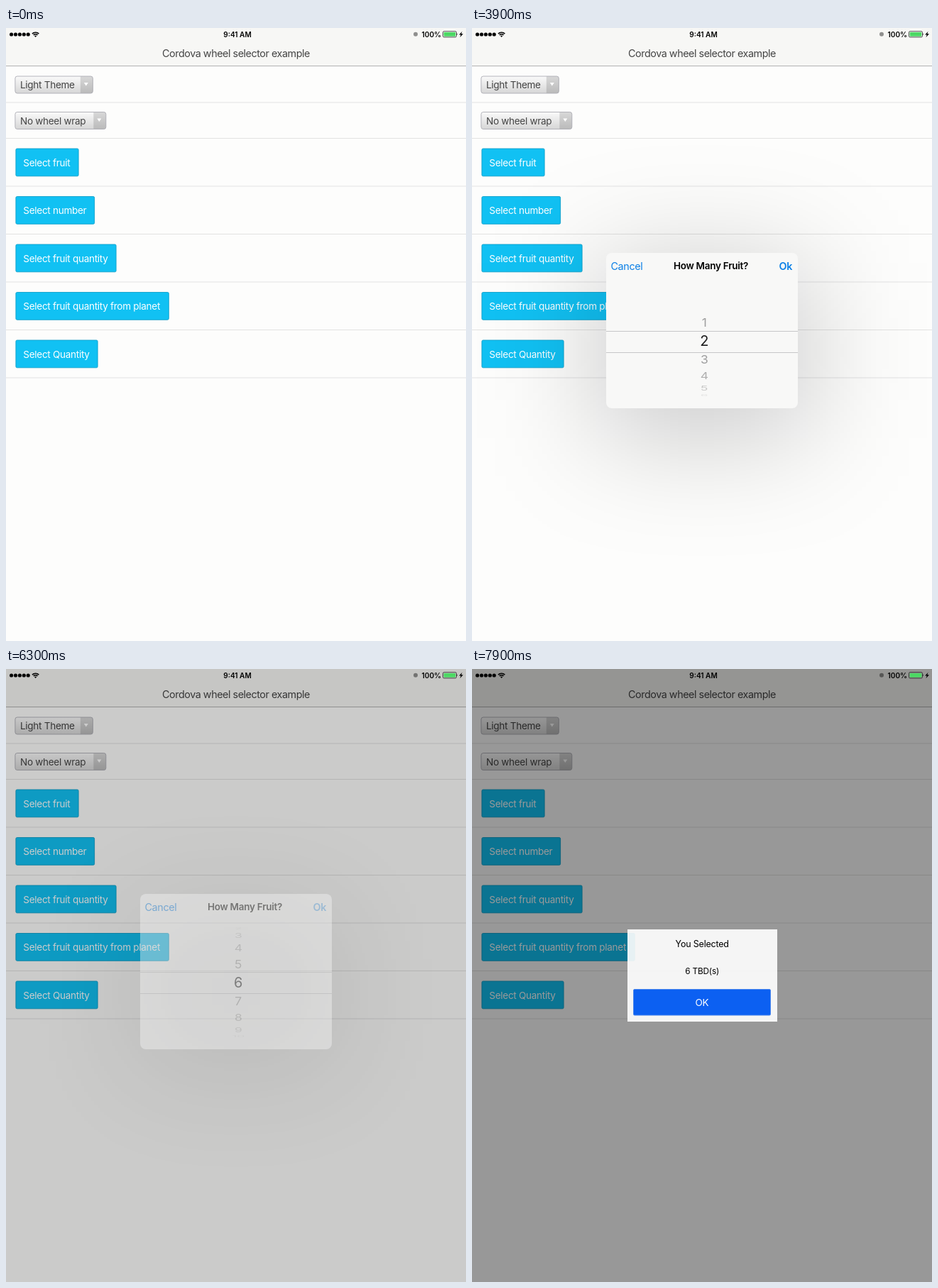
These frames come from a looping animation (648x864 px, 8000 ms). An HTML page:

```html
<!DOCTYPE html>
<html lang="en">
<head>
<meta charset="utf-8">
<title>Wheel selector</title>
<style>
  html, body { margin: 0; width: 100%; height: 100%; overflow: hidden; background: #fdfdfc; }
  body { position: relative; }
  svg, div { position: absolute; display: block; }
  svg { left: 0; top: 0; }
  text { font: 13.5px Inter, Roboto, sans-serif; letter-spacing: -.27px; fill: #444; }
  .mid { text-anchor: middle; }
  .title { font-size: 14.34px; letter-spacing: -.45px; }
  .status { font-size: 10.1px; font-weight: 600; letter-spacing: 0; fill: #000; }
  .button rect { fill: #11c1f3; stroke: #0a9dc7; stroke-width: .84; }
  .button text { fill: #fff; }

  .backdrop, .alert, .press, .popup, .shadow, .ok {
    animation: 8s step-end infinite;
  }
  .backdrop {
    left: 0; top: 0; width: 648px; height: 864px;
    background: rgba(0, 0, 0, .4);
    animation-name: dim;
  }
  .alert {
    left: 219px; top: 367px; width: 211px; height: 130px;
    background: rgba(255, 255, 255, .9);
    animation-name: alert;
  }
  .alert text { fill: #000; }
  .alert .head { font-size: 12.5px; letter-spacing: -.2px; }
  .alert .body { font-size: 11.8px; letter-spacing: -.18px; }
  .alert .label { fill: #fff; }
  .press { animation-name: press; }
  .shadow {
    left: 174px; top: 331px; width: 300px; height: 247px;
    background: rgba(0, 0, 8, .2);
    filter: blur(80px);
    animation-name: popup;
  }
  .popup {
    left: 189px; top: 317px; width: 270px; height: 219px;
    border-radius: 8px; background: #f8f8f7;
    animation-name: popup;
  }
  .popup .head { font-weight: 600; fill: #000; }
  .popup .action { font-size: 14.34px; letter-spacing: -.35px; fill: #0a7fe6; }
  .popup .ok { font-weight: 600; animation-name: tap; }
  #wheel text { letter-spacing: 0; }

  @keyframes popup {
    0% { opacity: 0; }
    28.75% { opacity: .15; }
    30% { opacity: .4; }
    31.25% { opacity: .7; }
    32.5% { opacity: .9; }
    33.75% { opacity: 1; }
    77.5% { opacity: .8; }
    78.75% { opacity: .4; }
    80% { opacity: .07; }
    81.25%, 100% { opacity: 0; }
  }
  @keyframes tap {
    0% { opacity: 1; }
    77.5% { opacity: .65; }
    80%, 100% { opacity: 1; }
  }
  @keyframes dim {
    0% { opacity: 0; }
    78.75% { opacity: .5; }
    80%, 100% { opacity: 1; }
  }
  @keyframes alert {
    0% { opacity: 0; transform: scale(1.2); }
    80% { opacity: .07; transform: scale(1.195); }
    81.25% { opacity: .65; transform: scale(1.07); }
    82.5%, 100% { opacity: 1; transform: none; }
  }
  @keyframes press {
    0% { fill: #387ef5; }
    97.5%, 100% { fill: #0c60f2; }
  }
</style>
</head>
<body>

<svg width="648" height="864" viewBox="0 0 648 864">
  <defs>
    <linearGradient id="face" x2="0" y2="1">
      <stop stop-color="#fafafa"/><stop offset="1" stop-color="#d6d6d6"/>
    </linearGradient>
    <linearGradient id="knob" x2="0" y2="1">
      <stop stop-color="#d8d8d8"/><stop offset="1" stop-color="#bababa"/>
    </linearGradient>
  </defs>
  <rect width="648" height="864" fill="#fdfdfc"/>
  <rect width="648" height="53" fill="#f7f7f5"/>
  <path d="M0 53.5H648" stroke="#b2b2b2"/>
  <text class="title mid" x="324" y="40.6">Cordova wheel selector example</text>
  <path d="M0 105H648M0 155.5H648M0 223H648M0 290.5H648M0 358H648M0 425.5H648M0 493H648" stroke="#ddd" stroke-width=".84"/>
  <g id="page"></g>
</svg>

<div class="backdrop"></div>

<svg width="648" height="20" viewBox="0 0 648 20">
  <path d="M7.6 9H31.5" stroke="#000" stroke-width="5.2" stroke-linecap="round" stroke-dasharray="0 5.9"/>
  <g fill="none" stroke="#000" stroke-width="1.5">
    <path d="M36.9 8.1a6.6 6.6 0 0 1 9.4 0M38.7 10a4 4 0 0 1 5.8 0"/>
  </g>
  <path d="M41.6 13l-1.6-1.7a2.3 2.3 0 0 1 3.2 0z"/>
  <text class="status mid" x="326" y="12.7">9:41 AM</text>
  <circle cx="577" cy="8.8" r="3" fill="#000" opacity=".42"/>
  <text class="status" x="585.5" y="12.7">100%</text>
  <rect x="615.5" y="4.7" width="19" height="8.2" rx="1.6" fill="none" stroke="#222" stroke-width=".8"/>
  <rect x="616.7" y="5.9" width="16.6" height="5.8" rx=".7" fill="#4cd964"/>
  <path d="M635.4 7.2q1.4 1.5 0 3.1z"/>
  <path d="M642.6 4.8l-4.4 4.6h2.6l-1.4 3.8 4.6-4.9h-2.7z"/>
</svg>

<div class="alert">
  <svg width="211" height="130" viewBox="219 367 211 130">
    <text class="head mid" x="324.2" y="391.5">You Selected</text>
    <text class="body mid" x="324.2" y="429.9">6 TBD(s)</text>
    <rect class="press" x="227.5" y="451.5" width="193" height="36.5" rx="1.5" stroke="#4a86ec"/>
    <text class="label mid" x="324" y="475">OK</text>
  </svg>
</div>

<div class="shadow"></div>
<div class="popup">
  <svg width="270" height="219" viewBox="189 317 270 219">
    <text class="action" x="195.5" y="341">Cancel</text>
    <text class="head mid" x="336.5" y="340.3">How Many Fruit?</text>
    <text class="action ok" x="432.5" y="341">Ok</text>
    <path d="M189 427.5H459M189 457.5H459" stroke="#c6c6c8"/>
    <g id="wheel"></g>
  </svg>
</div>

<script>
  const LOOP = 8000, STEP = 100;
  const ANGLE = 19.6 * Math.PI / 180, RADIUS = 77.5;

  const dropdown = (label, y, right) => {
    const knob = right - 17.5, cx = right - 9.5;
    return `<rect x="12.9" y="${y}" width="${right - 12.9}" height="24" rx="3" fill="url(#face)"/>
      <path d="M${knob} ${y}H${right - 3}q3 0 3 3v18q0 3-3 3H${knob}z" fill="url(#knob)"/>
      <rect x="12.9" y="${y}" width="${right - 12.9}" height="24" rx="3" fill="none" stroke="#acacb4" stroke-width=".9"/>
      <path d="M${cx - 3} ${y + 9}h6l-3 4.6z" fill="#fff"/>
      <text x="20" y="${y + 17}">${label}</text>`;
  };
  const button = (label, y, right) =>
    `<g class="button"><rect x="13.9" y="${y + .5}" width="${right - 14.3}" height="38.8" rx="1.7"/>
      <text x="24.3" y="${y + 25.2}">${label}</text></g>`;

  document.getElementById('page').innerHTML =
    dropdown('Light Theme', 68, 122.3) + dropdown('No wheel wrap', 118.5, 140.8) +
    [['fruit', 102.5], ['number', 125], ['fruit quantity', 155.5],
     ['fruit quantity from planet', 229.7], ['Quantity', 129.5]]
      .map(([name, right], i) => button('Select ' + name, 169.5 + 67.5 * i, right)).join('');

  const wheel = document.getElementById('wheel');
  const digits = Array.from({ length: 12 }, (_, i) => {
    const el = document.createElementNS('http://www.w3.org/2000/svg', 'text');
    el.textContent = i + 1;
    el.setAttribute('class', 'mid');
    return wheel.appendChild(el);
  });

  function position(t) {
    const p = Math.min(1, Math.max(0, (t - 3200) / 2330));
    return 1 + 5 * (.5 - .5 * Math.cos(Math.PI * p));
  }

  function turn(pos) {
    digits.forEach((el, i) => {
      const offset = i + 1 - pos, a = offset * ANGLE;
      const picked = Math.abs(offset) < .5, depth = Math.cos(a);
      const shown = Math.abs(a) < Math.PI / 2;
      const size = picked ? 20 : 17.5;
      el.style.display = shown ? '' : 'none';
      el.style.fontSize = size + 'px';
      el.style.fill = picked ? '#1c1c1c' : '#9a9a9a';
      el.style.opacity = picked ? 1 : Math.max(0, depth);
      el.setAttribute('y', size * .36);
      el.setAttribute('transform',
        `translate(327.3 ${442 + RADIUS * Math.sin(a)}) scale(1 ${depth})`);
    });
  }

  function draw() {
    const t = Math.floor(performance.now() % LOOP / STEP) * STEP;
    turn(position(t));
    requestAnimationFrame(draw);
  }
  draw();
</script>
</body>
</html>
```
